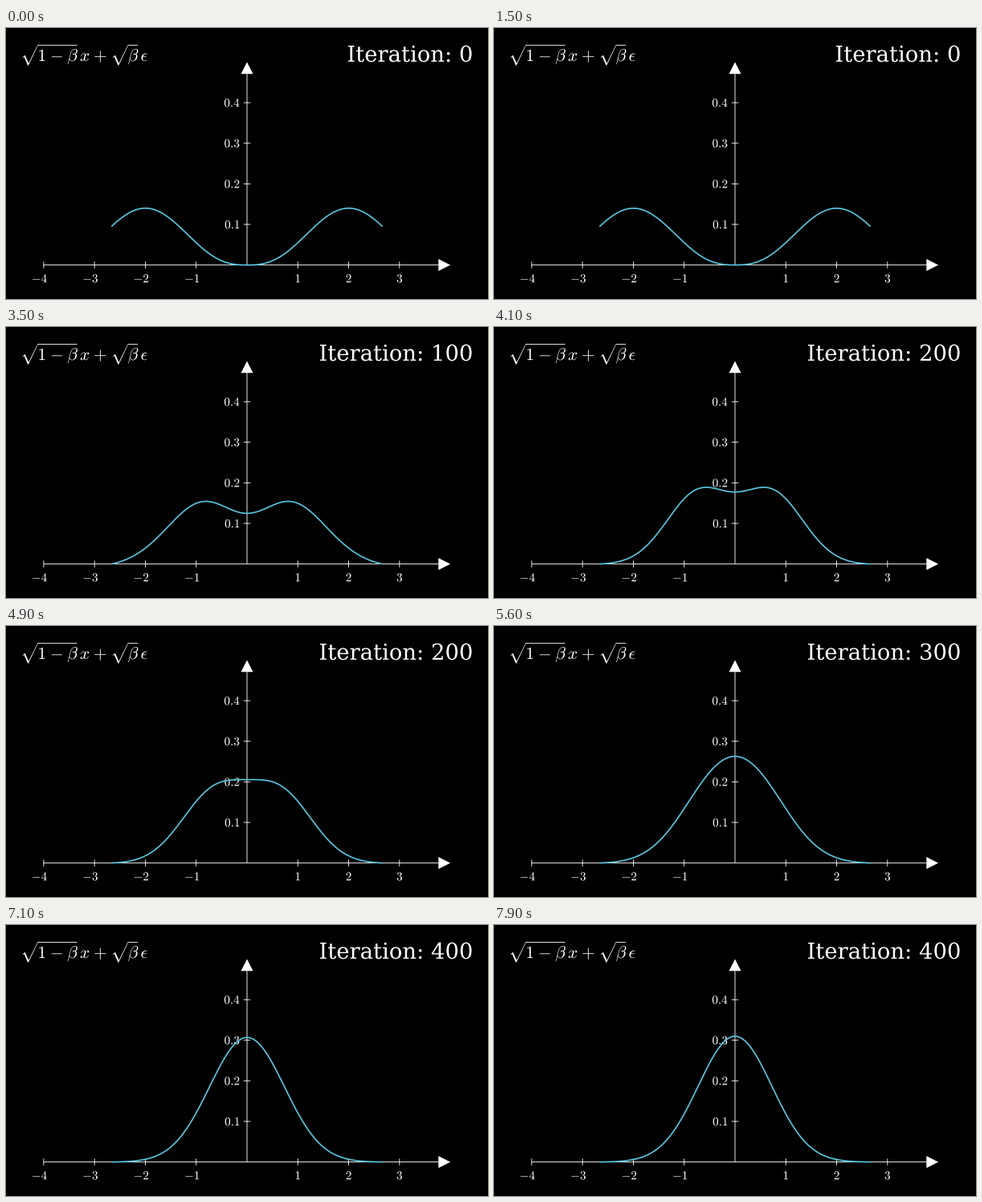
A matplotlib script that plays this animation: 600 px wide and 338 px high, repeating every 8 s.

```python
import matplotlib.pyplot as plt
import numpy as np
from matplotlib.animation import FuncAnimation
from matplotlib.patches import PathPatch, Polygon
from matplotlib.path import Path
from matplotlib.textpath import TextPath

W, H, DPI = 600, 338, 100
FRAMES, STEP = 80, 100
PX = W / DPI * 72 / W                 # one pixel in points
OX, OY, SIDE = 300, 295.6, 253.1      # origin and length of each half axis
UX, UY = SIDE / 4, SIDE / 0.5
START, PERIOD, RUN = 1.47, 1.5, 1.0
EDGE = 8 / 3
WHITE, BLUE = "white", "#58C4DD"

plt.rcParams["mathtext.fontset"] = "cm"
fig = plt.figure(figsize=(W / DPI, H / DPI), dpi=DPI, facecolor="black")
ax = fig.add_axes([0, 0, 1, 1])
ax.set_xlim(0, W)
ax.set_ylim(H, 0)
ax.axis("off")


def text_path(s, size, x, y, align="origin"):
    """Glyph outlines with the baseline at y, aligned on their ink."""
    path = TextPath((0, 0), s, size=size, prop={"family": "DejaVu Serif"})
    box = path.get_extents()
    shift = {"origin": 0, "center": (box.x0 + box.x1) / 2, "right": box.x1}[align]
    return Path(path.vertices * [1, -1] + [x - shift, y], path.codes)


def put(path):
    return ax.add_patch(PathPatch(path, fc=WHITE, lw=0, zorder=2))


def line(xs, ys):
    ax.plot(xs, ys, color=WHITE, lw=0.9 * PX, solid_capstyle="butt",
            snap=False, zorder=1)


def draw_axes(tip=14.8, half=7.5, tick=4.2):
    right, top = OX + SIDE, OY - SIDE
    line([OX - SIDE, right - tip], [OY, OY])
    line([OX, OX], [top + tip, OY])
    for corners in ([(right, OY), (right - tip, OY - half), (right - tip, OY + half)],
                    [(OX, top), (OX - half, top + tip), (OX + half, top + tip)]):
        ax.add_patch(Polygon(corners, fc=WHITE, lw=0))
    for n in range(-4, 4):
        if n:
            x = OX + n * UX
            line([x, x], [OY - tick, OY + tick])
            put(text_path(f"${n}$", 15.2, x - 5 * (n < 0), 317.3, "center"))
    for n in range(1, 5):
        y = OY - n * UY / 10
        line([OX - tick, OX + tick], [y, y])
        put(text_path(f"$0.{n}$", 15.2, 290.3, y + 5.1, "right"))


def radical(x, base, em, inner):
    """Root sign whose bar covers a width of `inner` em."""
    pts = np.array([(.11, .22), (.26, .34), (.47, -.13), (1, .944),
                    (1 + inner, .944), (1 + inner, .904), (1.01, .904),
                    (.46, -.25), (.424, -.255), (.205, .25), (.137, .198)])
    ax.add_patch(Polygon(pts * [em, -em] + [x, base], fc=WHITE, lw=0, zorder=2))


def draw_formula(x=18.1, base=41.2, em=21.4):
    # glyph, pen advance in em, width under a root's bar
    parts = [("root", 1, 2.288), ("1", .722, 0), ("-", 1, 0), (r"\beta", .733, 0),
             ("x", .794, 0), ("+", 1, 0), ("root", 1, .566),
             (r"\beta", .733, 0), (r"\epsilon", .406, 0)]
    for glyph, advance, inner in parts:
        if glyph == "root":
            radical(x, base, em, inner)
        else:
            put(text_path(f"${glyph}$", em, x, base))
        x += advance * em


def two_bumps(x, center, width, height):
    """Mirrored Gaussian bumps that reach zero at the ends of the range."""
    bumps = sum(np.exp(-((x - c) / width) ** 2 / 2) for c in (center, -center))
    return height * bumps * (1 - (x / EDGE) ** 12)


def smooth(t):
    def sig(v):
        return 1 / (1 + np.exp(-v))
    e = sig(-5)
    return np.clip((sig(10 * (t - .5)) - e) / (1 - 2 * e), 0, 1)


def counter(n):
    return text_path(f"Iteration: {n}", 27.45, 579.6, 42, "right")


# the two modes start at -2 and 2 and drift together every hundred iterations
xs = np.linspace(-EDGE, EDGE, 241)
shapes = [(.66, .140), (.62, .174), (.70, .159), (.68, .165), (.68, .162)]
densities = [.14 * np.abs(np.sin(np.pi * xs / 4)) ** 2.7]
densities += [two_bumps(xs, 2 * .6 ** k, width, height)
              for k, (width, height) in enumerate(shapes, 1)]

draw_axes()
draw_formula()
label = put(counter(0))
curve, = ax.plot(OX + UX * xs, OY - UY * densities[0], color=BLUE, lw=1.7 * PX,
                 solid_capstyle="butt", zorder=3)


def update(frame):
    t = frame * STEP / 1000 - START
    k = max(int(t // PERIOD), 0)
    p = np.clip((t - k * PERIOD) / RUN, 0, 1)
    s = smooth(p)
    curve.set_ydata(OY - UY * ((1 - s) * densities[k] + s * densities[k + 1]))
    label.set_path(counter(100 * (k + int(p >= 1))))
    return curve, label


anim = FuncAnimation(fig, update, frames=FRAMES, interval=STEP,
                     repeat=True, repeat_delay=0, blit=False)
plt.show()
```
